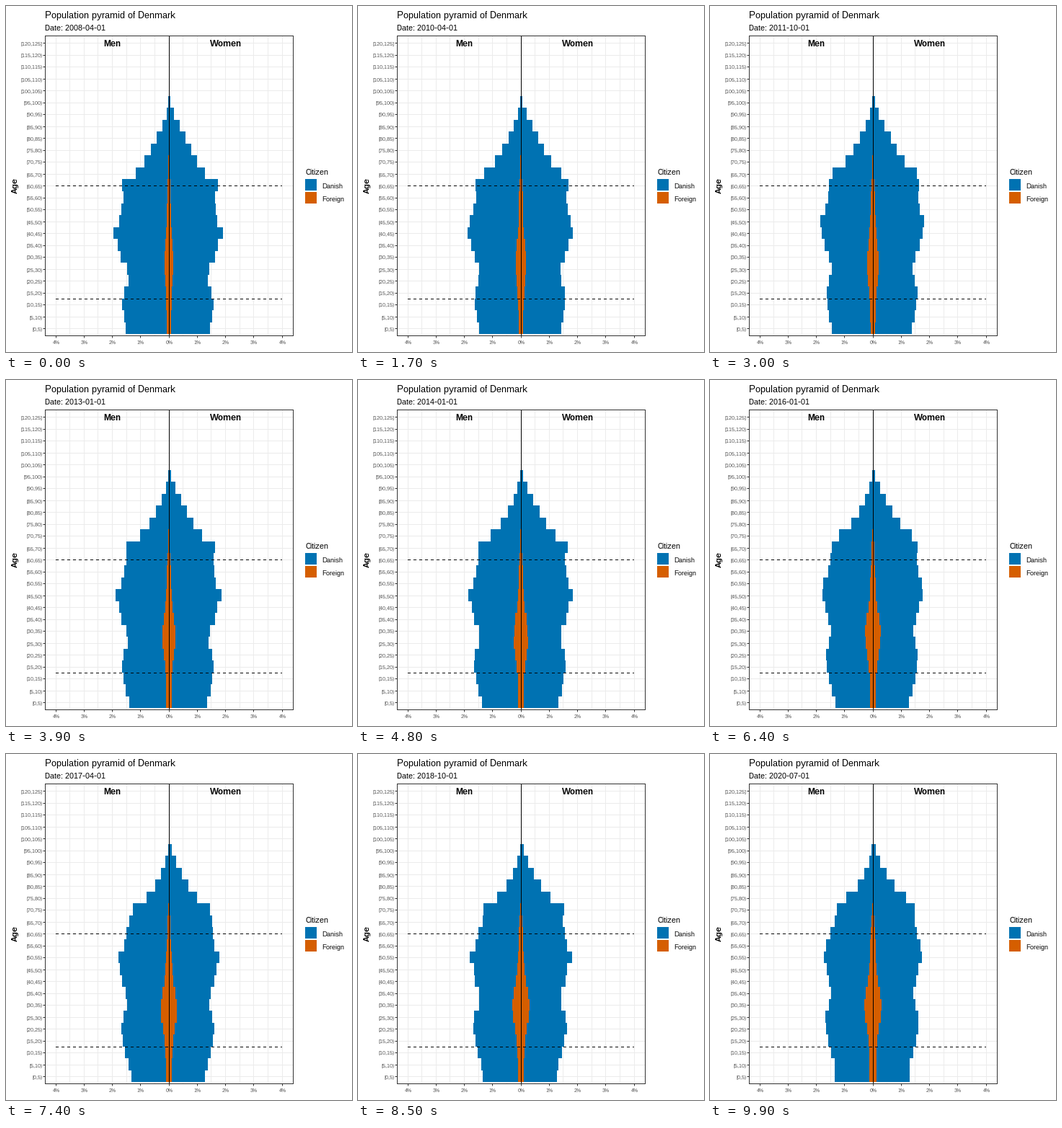
Recreate the animation shown at these times as a matplotlib script. Size 480 by 480 pixels, loop 10 s.

```python
import numpy as np
import matplotlib.pyplot as plt
from matplotlib.animation import FuncAnimation
from matplotlib.patches import Rectangle

plt.rcParams.update({
    "font.family": "Liberation Sans",
    "text.hinting": "native",
    "text.hinting_factor": 1,
})

SIZE, DPI = 480, 100
PX = 72 / DPI                       # one pixel in points
LEFT, RIGHT, TOP, BOTTOM = 54.5, 398.5, 41.5, 457.5
MID, UNIT, ROW = 226, 39.25, 16.5   # zero line, pixels per 1 %, row height
BLUE, ORANGE = "#0072B2", "#D55E00"
FRAME, LABEL, GRID = "#333333", "#4D4D4D", "#EBEBEB"
TICKS, START, SPAN = 100, 2008.25, 12.25

GROUPS = 20
AGE = 2.5 + 5 * np.arange(GROUPS)   # middle of each age group

# Size of a generation (bar length at birth) at the turns of the birth curve.
BIRTHS = [(1911, 20), (1921, 39), (1931, 46), (1936, 50.5), (1941, 60),
          (1946, 78.5), (1951, 69.5), (1961, 69.5), (1966, 75.5),
          (1971, 66.5), (1976, 62.5), (1981, 55), (1986, 54.5), (1991, 61.5),
          (1996, 64.5), (2006, 60), (2014, 52), (2018, 53)]


def bell(x, middle, width):
    return np.exp(-((x - middle) / width) ** 2)


def population(year, women):
    """Generations age, gain by immigration and shrink by Gompertz mortality."""
    born = np.interp(year - AGE, *zip(*BIRTHS))
    arrived = 1 + 0.08 * bell(AGE, 35, 14)
    share, level, rate = (0.955, 0.43, 0.095) if women else (1, 0.755, 0.084)
    alive = np.exp(-level * np.exp(rate * (AGE - 80)))
    return share * born * arrived * alive


def foreigners(year):
    """A base that thins out with age plus a growing bulge of young adults."""
    p = (year - START) / SPAN
    base = (3 + 1.5 * p) / (1 + np.exp((AGE - 65) / 6))
    bulge = 3 + 4.5 * np.sin(p * np.pi / 2)
    return base + bulge * bell(AGE, 28 + 4 * p, 12 - 1.5 * p)


fig = plt.figure(figsize=(SIZE / DPI, SIZE / DPI), dpi=DPI, facecolor="white")
ax = fig.add_axes([0, 0, 1, 1])
ax.set_xlim(0, SIZE)
ax.set_ylim(SIZE, 0)
ax.axis("off")


def line(x0, y0, x1, y1, color, z, **kw):
    ax.plot([x0, x1], [y0, y1], color=color, lw=PX, zorder=z,
            snap=False, solid_capstyle="butt", **kw)


def text(x, y, s, px, color="black", **kw):
    return ax.text(x, y, s, fontsize=px * PX, color=color, zorder=9, **kw)


def rect(x, y, w, h, color, z):
    return ax.add_patch(Rectangle((x, y), w, h, fc=color, lw=0, zorder=z,
                                  antialiased=False))


def pixel(v):
    return int(v) + 0.5


def row_y(i):
    return 447.5 - ROW * i


def make_bars(color, z):
    edges = np.floor(455.75 - 16.52 * np.arange(GROUPS + 1))
    return [rect(MID, t, 0, b - t, color, z)
            for b, t in zip(edges[:-1], edges[1:])]


def set_bars(bars, lengths, women):
    for bar, w in zip(bars, np.floor(lengths + 0.5)):
        bar.set_x(MID if women else MID - w)
        bar.set_width(w)


# grid, ticks and axis labels
for half in range(-8, 9):
    x = pixel(MID + half * UNIT / 2)
    line(x, TOP, x, BOTTOM, GRID, 1)
    if half % 2 == 0:
        line(x, BOTTOM, x, BOTTOM + 3, FRAME, 6)
        text(x, 469, f"{abs(half) // 2}%", 7, LABEL, ha="center")
for i in range(25):
    y = pixel(row_y(i))
    line(LEFT, y, RIGHT, y, GRID, 1)
    line(LEFT - 3, y, LEFT, y, FRAME, 6)
    close = "]" if i == 24 else ")"
    text(50, y + 3, f"[{5 * i},{5 * i + 5}{close}", 7, LABEL, ha="right")

sides = [(women, make_bars(BLUE, 2), make_bars(ORANGE, 3))
         for women in (False, True)]

# reference lines and panel border
line(MID + 0.5, TOP, MID + 0.5, BOTTOM, "black", 5)
for i in (2.5, 12):
    y = pixel(row_y(i))
    line(MID - 4 * UNIT, y, MID + 4 * UNIT, y, "black", 5,
         linestyle=(0, (4, 4)), dash_capstyle="butt")
for x in (LEFT, RIGHT):
    line(x, TOP - 0.5, x, BOTTOM + 0.5, FRAME, 6)
for y in (TOP, BOTTOM):
    line(LEFT - 0.5, y, RIGHT + 0.5, y, FRAME, 6)

# titles and legend
text(54, 17, "Population pyramid of Denmark", 13)
date = text(54, 34, "", 11)
text(MID - 2 * UNIT, 56, "Men", 12, weight="bold", ha="center")
text(MID + 2 * UNIT, 56, "Women", 12, weight="bold", ha="center")
text(12.5, 249.5, "Age", 11, weight="bold", rotation=90,
     ha="center", va="center")
text(415, 234, "Citizen", 11)
for y, name, color in ((240, "Danish", BLUE), (258, "Foreign", ORANGE)):
    rect(415, y, 16, 16, color, 2)
    text(438, y + 13, name, 9)


def update(tick):
    step = max(tick - 1, 0)         # two steps per quarter
    quarter = 1 + step // 2
    date.set_text(f"Date: {2008 + quarter // 4}-{1 + 3 * (quarter % 4):02d}-01")
    year = START + step / 8
    for women, total, foreign in sides:
        set_bars(total, population(year, women), women)
        set_bars(foreign, foreigners(year), women)
    return []


anim = FuncAnimation(fig, update, frames=TICKS, interval=100,
                     repeat=True, repeat_delay=0, blit=False)
plt.show()
```
